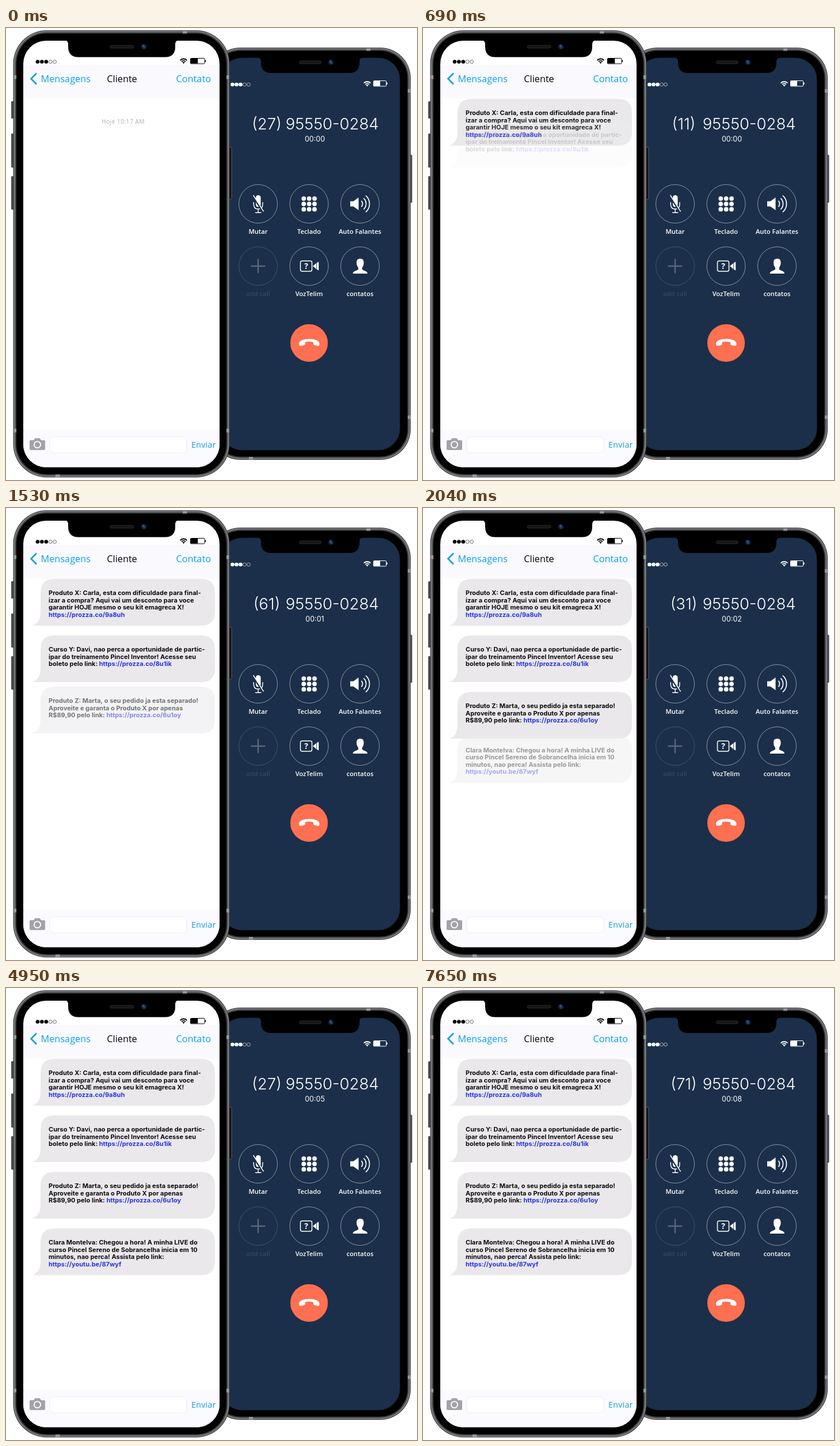
Write an HTML page with a canvas that moves like this. It is 714 px wide and 784 px high and loops after 8 s.

```html
<!DOCTYPE html>
<html lang="pt">
<head>
<meta charset="utf-8">
<title>Mensagens e chamada</title>
<style>
html, body { margin: 0; width: 100%; height: 100%; overflow: hidden; background: #fff; }
canvas { display: block; width: 714px; height: 784px; }
</style>
</head>
<body>
<canvas id="stage" width="714" height="784"></canvas>
<script>
const ctx = document.getElementById('stage').getContext('2d');
const LOOP = 8000, SLIDE = 600, CODE_STEP = 450, SECOND = 900;
const SANS = '"Open Sans", "Noto Sans", sans-serif';
const ROUND = 'Inter, Roboto, sans-serif';
const BLUE = '#0a9fee', NAVY = '#1b2f4a', BUBBLE = '#eae8eb';
const CODES = [27, 11, 21, 61, 31, 85, 71, 47, 41, 51, 48];
const MESSAGES = [
  ['Produto X: Carla, esta com dificuldade para final-',
   'izar a compra? Aqui vai um desconto para voce',
   'garantir HOJE mesmo o seu kit emagreca X!',
   'https://prozza.co/9a8uh'],
  ['Curso Y: Davi, nao perca a oportunidade de partic-',
   'ipar do treinamento Pincel Inventor! Acesse seu',
   'boleto pelo link: https://prozza.co/8u1ik'],
  ['Produto Z: Marta, o seu pedido ja esta separado!',
   'Aproveite e garanta o Produto X por apenas',
   'R$89,90 pelo link: https://prozza.co/6u1oy'],
  ['Clara Montelva: Chegou a hora! A minha LIVE do',
   'curso Pincel Sereno de Sobrancelha inicia em 10',
   'minutos, nao perca! Assista pelo link:',
   'https://youtu.be/87wyf']
];

function text(s, x, y, font, color, align = 'left', spacing = 0) {
  ctx.font = font;
  ctx.fillStyle = color;
  ctx.textAlign = align;
  ctx.letterSpacing = spacing + 'px';
  ctx.fillText(s, x, y);
}

function box(x, y, w, h, r, fill, stroke, lw = 1) {
  ctx.beginPath();
  ctx.roundRect(x, y, w, h, r);
  if (fill) { ctx.fillStyle = fill; ctx.fill(); }
  if (stroke) { ctx.strokeStyle = stroke; ctx.lineWidth = lw; ctx.stroke(); }
}

function disc(x, y, r, fill, stroke, lw = 1) {
  ctx.beginPath();
  ctx.arc(x, y, r, 0, 7);
  if (fill) { ctx.fillStyle = fill; ctx.fill(); }
  if (stroke) { ctx.strokeStyle = stroke; ctx.lineWidth = lw; ctx.stroke(); }
}

function path(d, fill, stroke, lw = 1) {
  const p = new Path2D(d);
  if (fill) { ctx.fillStyle = fill; ctx.fill(p); }
  if (stroke) { ctx.strokeStyle = stroke; ctx.lineWidth = lw; ctx.stroke(p); }
}

function arc(x, y, r, a, b, color, lw) {
  ctx.beginPath();
  ctx.arc(x, y, r, a, b);
  ctx.strokeStyle = color;
  ctx.lineWidth = lw;
  ctx.stroke();
}

function shell(x, y, w, h, r) {
  const layers = [[0, '#3a3a3c'], [1.3, '#8f8f92'], [2.6, '#58585b'], [4.6, '#2a2a2c'], [5.8, '#000']];
  for (const [d, c] of layers) box(x + d, y + d, w - 2 * d, h - 2 * d, r - d, c);
}

function notch(cx, y, half, h) {
  const l = cx - half, r = cx + half, b = y + h;
  path(`M${l - 7} ${y - 1}Q${l} ${y - 1} ${l} ${y + 7}V${b - 18}Q${l} ${b} ${l + 18} ${b}` +
       `H${r - 18}Q${r} ${b} ${r} ${b - 18}V${y + 7}Q${r} ${y - 1} ${r + 7} ${y - 1}Z`, '#000');
}

function sensors(cx, y, w, camX) {
  box(cx - w / 2, y - 2.5, w, 5, 2.5, '#161617', '#2b2b2d', 1);
  disc(camX, y, 5, '#0a1626');
  disc(camX, y, 3.2, '#0d3b6e');
  disc(camX - 1, y - 1.5, 1.2, '#2f7fc4');
  disc(camX + 1, y + 1.8, 0.9, '#2467a5');
}

function status(color, dotX, dotY, gap, wifiX, wifiY, batX, batY, batW) {
  for (let i = 0; i < 5; i++) {
    const full = i < 3;
    disc(dotX + i * gap, dotY, full ? 3.3 : 2.9, full && color, !full && color, 0.6);
  }
  for (const r of [4.6, 8]) arc(wifiX, wifiY, r, -2.4, -0.74, color, 1.8);
  path(`M${wifiX} ${wifiY + .5}l-2.2 -2.4q2.2 -1.6 4.4 0z`, color);
  box(batX + .5, batY + .5, batW, 9.5, 1, null, color, 1);
  box(batX + 1, batY + 1, batW / 2, 8.5, 0, color);
  box(batX + batW + 1.2, batY + 3.4, 1.5, 3.6, 0.6, color);
}

function callIcons() {
  const W = '#fff';
  // muted microphone
  box(434, 290, 8.5, 20.5, 4.2, W);
  path('M430.3 302v4q0 8 7.8 8t7.8 -8v-4M438.1 314v6M433 320.3h10.5', null, W, 1.4);
  path('M428.8 291l18 28', null, NAVY, 3.6);
  path('M429.6 290l18 28.4', null, W, 1.5);
  // keypad
  for (let i = 0; i < 9; i++) disc(517.2 + i % 3 * 9.4, 295.8 + (i / 3 | 0) * 9.3, 3.9, W);
  // loudspeaker
  path('M598 300.5h5.5l9 -6.5v22l-9 -6.5h-5.5z', W);
  [[6, 0.8], [12, 0.83], [18, 0.86]].forEach(([r, a]) => arc(612.5, 305, r + 1, -a, a, W, 1.7));
  // plus
  path('M425.5 413h25M438 400.5v25', null, '#56657a', 2.4);
  // video
  box(511.5, 404, 20, 18, 3, null, W, 1.5);
  text('?', 521.5, 418, '700 14px ' + SANS, W, 'center');
  path('M533 413l6 -5v10zM539.8 407.2l3.4 -1.7v15l-3.4 -1.7z', W);
  // person
  path('M615.3 400c5 0 6.6 3.6 6.2 8c-.2 4 -1.6 6 -2.8 7.6v3c1.2 2.6 9 2.4 9.3 7.4' +
       'h-25.4c.3 -5 8.1 -4.8 9.3 -7.4v-3c-1.2 -1.6 -2.6 -3.6 -2.8 -7.6c-.4 -4.4 1.2 -8 6.2 -8z', W);
}

function callPhone(t) {
  shell(354, 34, 349, 715, 53);
  box(702, 220, 3.6, 83, 1.5, '#4b4b4e');
  box(626, 35, 7, 4.5, 0, '#98989b');
  box(422, 744, 7, 4.5, 0, '#98989b');
  box(698, 106, 4.5, 6, 0, '#98989b');
  box(698, 672, 4.5, 6, 0, '#98989b');
  box(373, 52, 311, 680, 37, NAVY, '#14263f', 1);
  notch(528.5, 52, 85.5, 26);
  sensors(528.5, 59.5, 38, 564.5);
  status('#fff', 393.5, 98, 7, 627.5, 101, 638, 91, 22);

  const code = CODES[Math.floor(t / CODE_STEP) % CODES.length];
  const sec = Math.floor(t / SECOND);
  text(`(${code})`, 453, 176, '300 27.5px ' + ROUND, '#fff', 'center');
  text('95550-0284', 647.5, 176, '300 27.5px ' + ROUND, '#fff', 'right');
  text('00:0' + sec, 536.5, 197, '400 12.5px ' + ROUND, '#fff', 'center');

  const labels = ['Mutar', 'Teclado', 'Auto Falantes', 'add call', 'VozTelim', 'contatos'];
  labels.forEach((s, i) => {
    const x = 438 + i % 3 * 88.5, y = i < 3 ? 305 : 413, dim = i === 3;
    disc(x, y, 33.5, null, dim ? '#44546a' : '#8a95a3', 1);
    text(s, x, y + 52, '600 11.2px ' + SANS, dim ? '#35475f' : '#fff', 'center');
  });
  callIcons();
  disc(526.5, 546.3, 32.6, '#ff6f51');
  path('M509 547.5c0 -11 35.5 -11 35.5 0c0 4 -1 4 -4 3.5c-5 -.7 -6.6 -1 -6.6 -3.4v-2.6' +
       'c-4 -1.4 -10.3 -1.4 -14.3 0v2.6c0 2.4 -1.6 2.7 -6.6 3.4c-3 .5 -4 .5 -4 -3.5z', '#fff');
}

function message(lines, i, t) {
  const u = Math.min(1, Math.max(0, t / SLIDE - i));
  if (!u) return;
  ctx.save();
  ctx.globalAlpha = u;
  ctx.translate(0, 123 + 98 * i - 98 * (1 - u) ** 3);
  path('M84 0H339Q363 0 363 24V57Q363 81 339 81H45.5Q60 76 60 57V24Q60 0 84 0Z', BUBBLE);
  lines.forEach((line, n) => {
    const y = 28 + n * 12.5, cut = line.indexOf('https');
    const plain = cut < 0 ? line : line.slice(0, cut);
    text(plain, 74, y, '700 11px ' + ROUND, '#0b0b0d');
    if (cut >= 0) text(line.slice(cut), 74 + ctx.measureText(plain).width, y, ctx.font, '#2433e6');
  });
  ctx.restore();
}

function chatPhone(t) {
  for (const [y, h] of [[127, 30], [183, 59], [257, 58]]) box(9, y, 5, h, 1.5, '#4b4b4e');
  box(387, 207, 5, 90, 1.5, '#111', '#6f7277', 0.8);
  shell(12.5, 4, 376, 775.5, 58);
  box(307, 5, 7.5, 4.5, 0, '#98989b');
  box(86, 774.5, 7.5, 4.5, 0, '#98989b');
  for (const x of [13.5, 383]) for (const y of [82, 695]) box(x, y, 4.5, 6.5, 0, '#98989b');

  ctx.save();
  box(30, 22, 341, 740, 40, '#fff');
  ctx.clip();
  box(30, 64, 341, 58, 0, '#faf9fd');
  box(30, 697, 341, 66, 0, '#fbfaff');
  status('#000', 55, 58.5, 7.4, 308.5, 61.5, 320, 52, 24.5);
  path('M53 78.5l-9.5 9.5l9.5 9.5', null, BLUE, 2.6);
  const head = '400 16.3px ' + SANS;
  text('Mensagens', 60.5, 94, head, BLUE);
  text('Cliente', 201.5, 94, head, '#000', 'center');
  text('Contato', 356, 94, head, BLUE, 'right');
  text('Hoje 10:17 AM', 166, 166, '400 10.3px ' + SANS, '#b1b1b4', 'left', 0.4);

  path('M43 715h5l2.5 -3.5h8l2.5 3.5h5q2 0 2 2v13q0 2 -2 2h-23q-2 0 -2 -2v-13q0 -2 2 -2z', '#a3a3a7');
  disc(54.5, 722.7, 5.6, null, '#fff', 1.8);
  box(76, 709, 238, 28, 7, '#fff', '#eeedf3', 1);
  text('Enviar', 322, 728, '400 14px ' + SANS, BLUE, 'left', 0.4);

  MESSAGES.forEach((m, i) => message(m, i, t));
  ctx.restore();
  notch(201, 22, 93, 28.5);
  sensors(201.5, 32.5, 41, 239.5);
}

function draw(now) {
  const t = now % LOOP;
  ctx.fillStyle = '#fff';
  ctx.fillRect(0, 0, 714, 784);
  callPhone(t);
  chatPhone(t);
}

let start;
function tick(now) {
  start ??= now;
  draw(now - start);
  requestAnimationFrame(tick);
}
requestAnimationFrame(tick);
</script>
</body>
</html>
```
